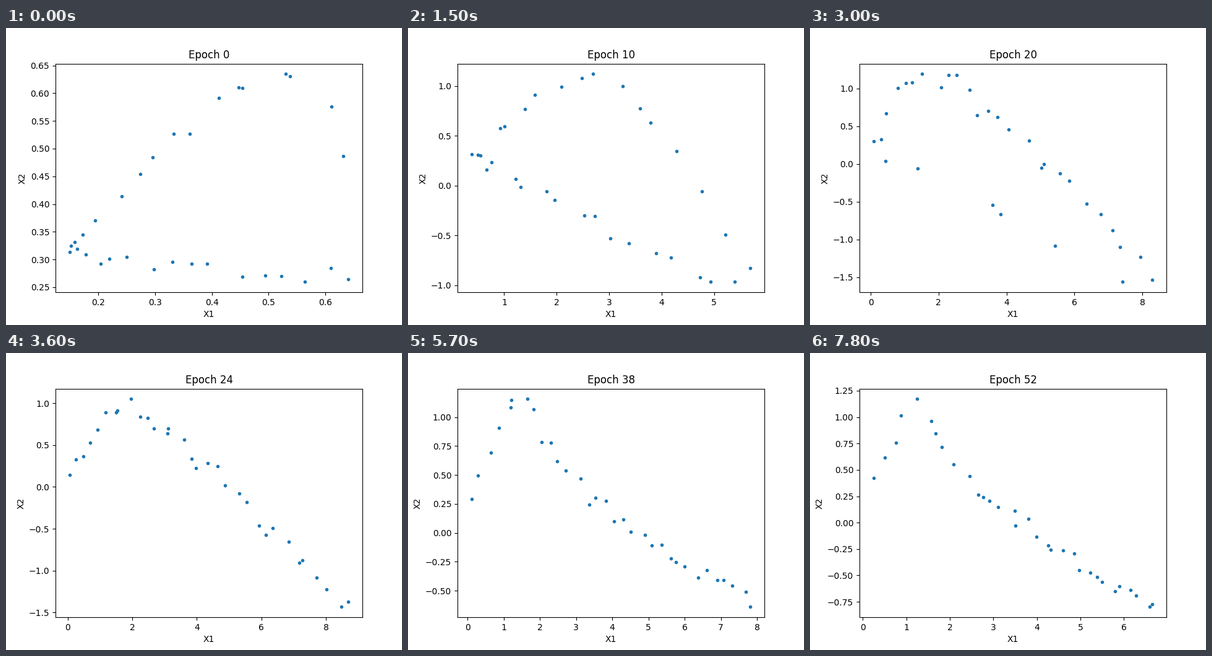
A matplotlib script that plays this animation: 640 px wide and 480 px high, repeating every 8000 ms.

```python
import matplotlib.pyplot as plt
import numpy as np
from matplotlib.animation import FuncAnimation

LOOP_MS, TICK_MS, HOLD_TICKS = 8000, 100, 3
EPOCHS_PER_STEP = 2
BATCH = 32

# Extent of the cloud at a few epochs: x low, x high, y low, y high
KEY_EXTENTS = {
    0: (.1493, .6407, .2595, .6345),
    4: (.750, 2.6916, .2284, .7008),
    14: (.127, 7.697, -1.762, 1.402),
    24: (.049, 8.70, -1.433, 1.049),
    32: (.054, 7.973, -.944, 1.238),
    44: (.159, 7.667, -.3385, 1.076),
    52: (.2425, 6.656, -.799, 1.1714),
}


def extent(epoch):
    keys = list(KEY_EXTENTS)
    return [np.interp(epoch, keys, side) for side in zip(*KEY_EXTENTS.values())]


def spread(count, skew, rng):
    """Evenly scattered positions in 0..1, denser towards 0."""
    return ((np.arange(count) + rng.uniform(size=count)) / max(count, 1)) ** skew


def arch(u, start, peak, fall):
    """Rise like a sine from start to 1 at the peak, then drop to 0."""
    rise = start + (1 - start) * np.sin(np.pi / 2 * np.minimum(u / peak, 1))
    drop = np.clip((u - peak) / (1 - peak), 0, 1) ** fall
    return rise - drop


def sample(epoch):
    """Draw a batch from a two-branched fold that opens into one arch."""
    rng = np.random.default_rng(epoch)
    x_low, x_high, y_low, y_high = extent(epoch)
    unfold = np.interp(epoch, [14, 24], [0, 1])
    start = (0.3 - 0.15 * unfold - y_low) / (y_high - y_low)
    peak = max(0.21, 0.85 - 0.035 * epoch)
    fall = np.interp(epoch, [24, 34], [1.2, 0.55])
    skew = 1.4 - 0.01 * epoch

    lower_count = round(BATCH / 2 * (1 - unfold))
    upper = spread(BATCH - lower_count, skew, rng)
    lower = spread(lower_count, skew, rng)
    x = np.concatenate([upper, lower])
    y = np.concatenate([arch(upper, start, peak, fall),
                        start * np.maximum(1 - 1.2 * lower, 0)])
    y += 0.025 * rng.normal(size=BATCH)

    # Stretch the batch so that it fills its extent.
    x = np.interp(x, [x.min(), x.max()], [x_low, x_high])
    y = np.interp(y, [y.min(), y.max()], [y_low, y_high])
    return x, y


fig, ax = plt.subplots(figsize=(6.4, 4.8), dpi=100)
dots, = ax.plot([], [], ".")
ax.set_xlabel("X1")
ax.set_ylabel("X2")


def update(tick):
    epoch = tick // HOLD_TICKS * EPOCHS_PER_STEP
    dots.set_data(*sample(epoch))
    ax.relim()
    ax.autoscale_view()
    ax.set_title(f"Epoch {epoch}")
    return dots,


anim = FuncAnimation(fig, update, frames=LOOP_MS // TICK_MS,
                     interval=TICK_MS, repeat=True, repeat_delay=0)
plt.show()
```
